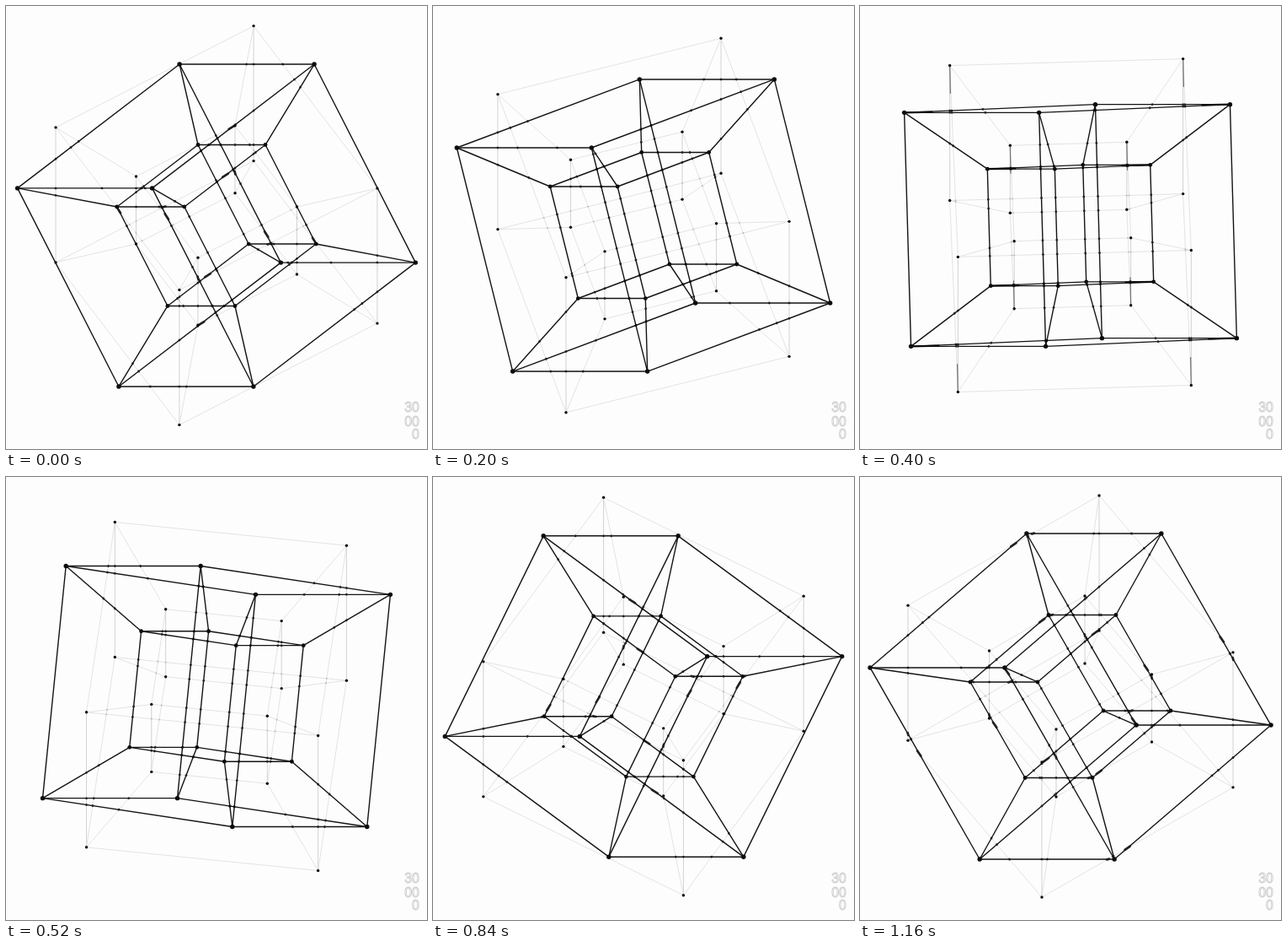
Animation, 500 px wide and 525 px high, one loop 1200 ms. Source, as an HTML page with a canvas:

```html
<!DOCTYPE html>
<html lang="en">
<head>
<meta charset="utf-8">
<title>Turning hypercubes</title>
<style>
  html, body { margin: 0; width: 100%; height: 100%; overflow: hidden; background: #fdfdfd; }
  canvas { display: block; }
</style>
</head>
<body>
<canvas id="stage" width="500" height="525"></canvas>
<script>
const ctx = document.getElementById('stage').getContext('2d');
const LOOP = 1200, STEP = 40;
const CX = 250, CY = 260, SHORT = 160.5, LONG = 196, SHIFT = 80;
const INK = '#0c0c0c';

// Vertex index within one figure: layer * 8 + side * 4 + corner
function figure(angle, bold) {
  const points = [], edges = [];
  for (let i = 0; i < 16; i++) {
    const scale = i < 8 ? 1 : 0.5;
    const shift = i & 4 ? SHIFT : -SHIFT;
    const a = angle + (i & 3) * Math.PI / 2;
    const x = Math.cos(a) * (bold ? SHORT : LONG) + (bold ? shift : 0);
    const y = Math.sin(a) * (bold ? LONG : SHORT) + (bold ? 0 : shift);
    points.push({ x: CX + x * scale, y: CY + y * scale });
  }
  const join = (i, j, axial) => {
    const p = points[i], q = points[j];
    const len = Math.hypot(q.x - p.x, q.y - p.y);
    edges.push({ p, q, len, ux: (q.x - p.x) / len, uy: (q.y - p.y) / len, bold, axial });
  };
  for (let i = 0; i < 16; i++) {
    join(i, (i & 12) | ((i + 1) & 3), false);
    if (!(i & 4)) join(i, i | 4, true);
    if (i < 8) join(i, i + 8, false);
  }
  return { points, edges };
}

function line(x1, y1, x2, y2, width, color) {
  ctx.lineWidth = width;
  ctx.strokeStyle = color;
  ctx.beginPath();
  ctx.moveTo(x1, y1);
  ctx.lineTo(x2, y2);
  ctx.stroke();
}

function dot(p, r) {
  ctx.fillStyle = INK;
  ctx.beginPath();
  ctx.arc(p.x, p.y, r, 0, Math.PI * 2);
  ctx.fill();
}

// Ink pools where two lines meet; the shallower the angle, the longer the pool
function pool(a, b) {
  const sin = a.ux * b.uy - a.uy * b.ux;
  const slope = Math.max(Math.abs(sin), 1e-4);
  const shared = a.p === b.p || a.p === b.q ? a.p : a.q === b.p || a.q === b.q ? a.q : null;
  const level = a.bold + b.bold;
  const width = [1.9, 2.7, 3][level];
  const color = ['#bdbdbd', '#202020', INK][level];

  if (shared) {
    const sa = shared === a.p ? 1 : -1, sb = shared === b.p ? 1 : -1;
    const cos = sa * sb * (a.ux * b.ux + a.uy * b.uy);
    if (cos < 0 || slope > 0.12) return;
    const reach = Math.min(1.4 / slope, a.len, b.len, 60);
    const dx = (a.ux * sa + b.ux * sb) / 2, dy = (a.uy * sa + b.uy * sb) / 2;
    line(shared.x, shared.y, shared.x + dx * reach, shared.y + dy * reach,
      level ? 2.4 : 1.2, level ? INK : '#707070');
    return;
  }
  if (slope < 1e-3) return;

  const dx = b.p.x - a.p.x, dy = b.p.y - a.p.y;
  const s = (dx * b.uy - dy * b.ux) / sin;
  const t = (dx * a.uy - dy * a.ux) / sin;
  const room = Math.min(s, a.len - s, t, b.len - t);
  if (room < 0) return;

  const half = slope > 0.5 ? 0.1 : Math.min(0.7 / slope, room + 0.1, 18);
  const sign = a.ux * b.ux + a.uy * b.uy < 0 ? -1 : 1;
  const mx = (a.ux + b.ux * sign) / 2 * half, my = (a.uy + b.uy * sign) / 2 * half;
  const x = a.p.x + a.ux * s, y = a.p.y + a.uy * s;
  line(x - mx, y - my, x + mx, y + my, width, color);
}

function label() {
  ctx.font = '16px "Liberation Sans", Arial, sans-serif';
  ctx.textAlign = 'right';
  ctx.lineWidth = 0.8;
  ctx.strokeStyle = '#c6c6c6';
  ctx.strokeText('30', 491, 481);
  ctx.strokeText('00', 491, 497.5);
  ctx.strokeText('0', 491, 512.5);
}

function draw(step) {
  const angle = (step * 3 - 77) * Math.PI / 180;
  const faint = figure(angle, false), strong = figure(angle, true);
  const edges = faint.edges.concat(strong.edges);

  ctx.fillStyle = '#fdfdfd';
  ctx.fillRect(0, 0, 500, 525);
  ctx.lineCap = 'round';
  label();

  for (const e of edges) {
    const color = e.bold ? '#141414' : e.axial ? '#cdcdcd' : '#e0e0e0';
    line(e.p.x, e.p.y, e.q.x, e.q.y, e.bold ? 1.4 : 0.9, color);
  }
  edges.forEach((a, i) => {
    for (let j = i + 1; j < edges.length; j++) pool(a, edges[j]);
  });
  faint.points.forEach(p => dot(p, 1.7));
  strong.points.forEach((p, i) => dot(p, i < 8 ? 2.7 : 2.4));
}

function tick() {
  draw(Math.floor(performance.now() % LOOP / STEP));
  requestAnimationFrame(tick);
}
tick();
</script>
</body>
</html>
```
